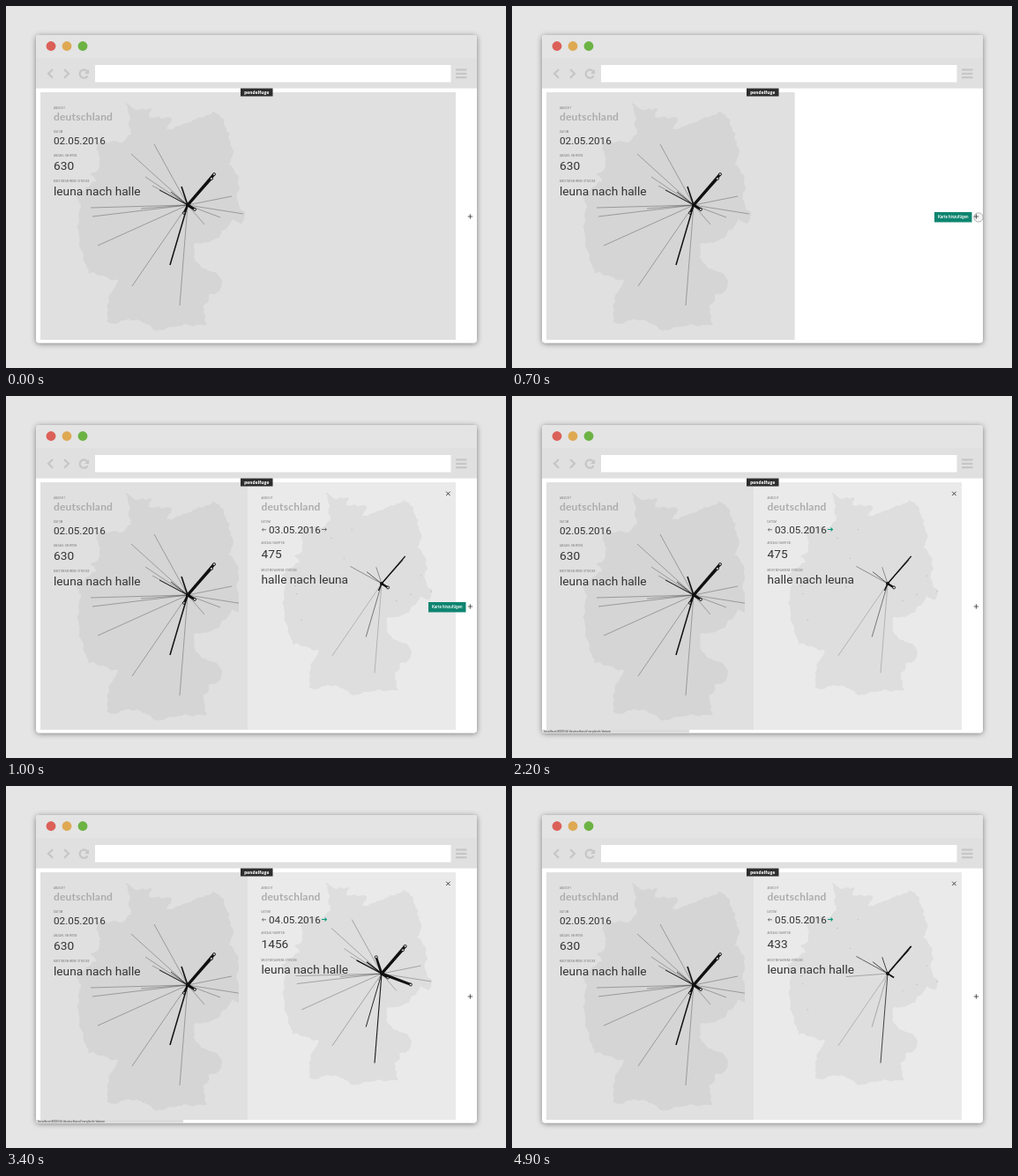
An HTML page that plays this animation: 567x411 px, repeating every 5100 ms.

```html
<!DOCTYPE html>
<html lang="de">
<head>
<meta charset="utf-8">
<title>Kartenvergleich</title>
<style>
html, body { margin: 0; width: 100%; height: 100%; overflow: hidden; background: #e5e5e5; }
svg { display: block; width: 567px; height: 411px; }
text { font-family: Roboto, Arial, sans-serif; fill: #333; }
.label { font-size: 2.9px; letter-spacing: .15px; fill: #777; }
.country { font: 700 12px Lato, sans-serif; letter-spacing: .2px; fill: #acacac; }
.date { font-size: 11.7px; }
.value { font-size: 13.7px; }
.icon { fill: none; stroke: #c6c6c6; stroke-width: 2.2; }
</style>
</head>
<body>
<svg viewBox="0 0 567 411">
  <defs>
    <filter id="shadow" x="-10%" y="-10%" width="120%" height="120%">
      <feDropShadow dx="0" dy="1" stdDeviation="3" flood-color="#000" flood-opacity=".45"/>
    </filter>
    <clipPath id="windowClip"><rect x="34" y="33" width="500" height="349.5"/></clipPath>
    <clipPath id="leftClip"><rect id="leftClipRect" x="39" y="98" height="281"/></clipPath>
    <clipPath id="rightClip"><rect x="284" y="98" width="216" height="281"/></clipPath>
  </defs>
  <rect x="34" y="33" width="500" height="349.5" rx="4" fill="#fff" filter="url(#shadow)"/>
  <path fill="#e4e4e4" d="M34 59V37q0-4 4-4H530q4 0 4 4V59Z"/>
  <rect x="34" y="59" width="500" height="34.5" fill="#e0e0e0"/>
  <circle cx="51" cy="45.5" r="5.4" fill="#db6058"/>
  <circle cx="69" cy="45.5" r="5.4" fill="#dfa953"/>
  <circle cx="87" cy="45.5" r="5.4" fill="#6cb344"/>
  <g class="icon">
    <path d="M53 72l-5 4.8l5 4.8M66 72l5 4.8l-5 4.8"/>
    <path d="M92.5 79.2a4.7 4.7 0 1 1-.4-5"/>
    <path d="M510 72.4h12.5M510 76.8h12.5M510 81.2h12.5"/>
  </g>
  <path fill="#c6c6c6" d="M94 72v5h-5Z"/>
  <rect x="101" y="67" width="403.5" height="19.5" fill="#fff"/>

  <rect id="leftBack" x="39" y="98" height="281" fill="#e0e0e0"/>
  <g id="leftMap" clip-path="url(#leftClip)"></g>
  <g id="leftText"></g>
  <g id="rightCard">
    <rect x="274" y="98" width="236" height="281" fill="#eaeaea"/>
    <g id="rightMaps" clip-path="url(#rightClip)"></g>
    <g id="rightText"></g>
    <path d="M499.2 108.6l4.4 4.4m0-4.4l-4.4 4.4" stroke="#333" stroke-width=".9"/>
    <path d="M295 151.8h-4.6m1.6-1.6l-1.6 1.6l1.6 1.6" fill="none" stroke="#444" stroke-width=".7"/>
    <circle id="nextRing" cx="362" cy="151.5" r="6.6" fill="#f3f3f3" stroke="#a9bcb6" stroke-width=".8"/>
    <path id="nextArrow" d="M358 151.5h5.4m-1.8-1.8l1.8 1.8l-1.8 1.8" fill="none"/>
  </g>

  <rect x="266" y="93.5" width="36.5" height="9" fill="#2d2d2d"/>
  <text x="284.3" y="99.7" text-anchor="middle" style="font:900 5.2px Lato,sans-serif;letter-spacing:.2px;fill:#fff">pendelfuge</text>

  <g id="addButton">
    <rect x="479" y="234" width="42.5" height="11.5" fill="#0e8570"/>
    <text x="500.2" y="241.4" text-anchor="middle" style="font-size:4.5px;font-weight:500;fill:#fff">Karte hinzufügen</text>
  </g>
  <circle id="addRing" cx="529" cy="240" r="5.2" fill="#f4f4f4" stroke="#999" stroke-width=".7"/>
  <path d="M523.7 239h5.4M526.4 236.3v5.4" stroke="#333" stroke-width=".8"/>
  <g id="status" clip-path="url(#windowClip)">
    <rect x="34" y="379" width="167" height="4" fill="#dcdcdc"/>
    <text x="36" y="382.3" style="font-size:3.6px;fill:#444">localhost:8000/#/deutschland/vergleich/datum</text>
  </g>
</svg>
<script>
const LOOP = 5100, STEP = 100;
const SLIDE_TIME = 400, SLIDE_WIDTH = 216, SMALL = .89;
const $ = id => document.getElementById(id);

// Border of the country as longitude, latitude pairs.
const border = [
  8.6,54.95, 10,54.75, 9.9,54.45, 11.1,54.4, 10.8,54.05, 12.5,54.47, 13.3,54.65, 14.2,53.92,
  14.4,53.25, 14.15,52.85, 14.65,52.5, 14.6,51.8, 15.04,51.27, 14.8,50.87, 14.35,51.03,
  12.3,50.2, 12.4,49.6, 13.8,48.77, 12.75,48.1, 13,47.5, 10.9,47.4, 10.2,47.3, 9.2,47.67,
  7.6,47.58, 7.7,48.4, 8.2,48.97, 6.6,49.2, 6.13,50.1, 6,50.8, 6.2,51.5, 5.95,51.83,
  7.05,52.3, 6.7,52.55, 7.05,52.65, 7.05,53.6, 8.3,53.6, 8.9,53.88, 8.75,54.2
];

// Destinations as dx, dy from the hub.
const places = [
  30,-35, 27,-30, 8,5, -4,9, -20,68, -7,-21, -9,114, -38,-69, -64,-58, -48,-32, -40,-22,
  -32,-17, -19,-15, -53,4, -110,3, -108,13, -102,46, -63,92, 63,10, 50,-10, 37,14, 19,22
];

// Line weights per day, by place; the rest get the base weight, and 0 is a single dot.
const days = [
  { base: .5, 0: 3.4, 1: 2.4, 2: 3, 3: 2.4, 4: 1.5, 5: 1.6, 11: 1, 12: .9 },
  { base: 0, 0: 1.4, 1: .9, 2: 2.2, 3: 1.4, 4: .7, 5: .6, 6: .2, 10: .6, 12: .8, 17: .2 },
  { base: .45, 0: 3.4, 1: 2, 2: 3, 4: 1, 5: 2.6, 6: 1.1, 11: 1.2, 12: 1.3, 20: 3 },
  { base: 0, 0: 1.7, 1: 1, 2: 1.8, 4: .4, 5: .9, 6: .9, 10: .8, 12: .9, 13: .4, 17: .2 }
];

const pairs = list => list.flatMap((v, i) => i % 2 ? [] : [[v, list[i + 1]]]);

function outline() {
  let seed = 7;
  const jitter = size => ((seed = seed * 16807 % 2147483647) / 2147483647 - .5) * size;
  let points = pairs(border).map(([lon, lat]) => [78 + (lon - 5.87) * 21.05, 106 + (55.06 - lat) * 33.76]);
  for (let pass = 0; pass < 4; pass++) {
    points = points.flatMap((p, i) => {
      const q = points[(i + 1) % points.length];
      const size = .33 * Math.hypot(q[0] - p[0], q[1] - p[1]);
      return [p, [(p[0] + q[0]) / 2 + jitter(size), (p[1] + q[1]) / 2 + jitter(size)]];
    });
  }
  return "M" + points.map(p => p.map(v => v.toFixed(1)).join(" ")).join("L") + "Z";
}
const country = outline();

function rays(x, y, day, scale) {
  return pairs(places).map(([dx, dy], i) => {
    const w = day[i] ?? day.base, ex = x + dx * scale, ey = y + dy * scale;
    if (!w) return `<circle cx="${ex}" cy="${ey}" r=".6" fill="#b5b5b5"/>`;
    const line = `<path d="M${x} ${y}L${ex} ${ey}" stroke="#111" stroke-width="${Math.max(w, .5)}" opacity="${Math.min(1, .3 + w * .6)}"/>`;
    return w < 2 ? line : line + `<circle cx="${ex}" cy="${ey}" r="1.5" fill="#ddd" stroke="#111" stroke-width=".9"/>`;
  }).join("") + `<circle cx="${x}" cy="${y}" r="2" fill="#111"/>`;
}

function cardText(x, dateX, rows, labels, values) {
  const names = ["ANSICHT", "DATUM", "ANZAHL FAHRTEN", "MEISTBEFAHRENE STRECKE"];
  const kinds = ["country", "date", "value", "value"];
  return names.map((name, i) =>
    `<text class="label" x="${x}" y="${labels[i]}">${name}</text>` +
    `<text class="${kinds[i]}" x="${i === 1 ? dateX : x}" y="${rows[i]}">${values[i]}</text>`).join("");
}

$("leftMap").innerHTML = `<path d="${country}" fill="#d5d5d5"/>` + rays(206, 226, days[0], 1);
$("leftText").innerHTML = cardText(54, 54, [130, 157, 186, 215.3], [117, 144, 171, 200],
  ["deutschland", "02.05.2016", "630", "leuna nach halle"]);

$("rightMaps").innerHTML = days.slice(1).map(day =>
  `<g><path transform="translate(241.8 11.7) scale(${SMALL})" d="${country}" fill="#dedede"/>${rays(426, 213, day, SMALL)}</g>`).join("");
const dayMaps = [...$("rightMaps").children];

$("rightText").innerHTML = [
  ["03.05.2016", "475", "halle nach leuna"],
  ["04.05.2016", "1456", "leuna nach halle"],
  ["05.05.2016", "433", "leuna nach halle"]
].map(values => `<g>${cardText(289.5, 298, [130, 155.8, 183.8, 213], [117, 144, 168, 199],
  ["deutschland", ...values])}</g>`).join("");
const dayTexts = [...$("rightText").children];

// CSS "ease" curve, solved by bisection.
function ease(t) {
  if (t <= 0) return 0;
  if (t >= 1) return 1;
  const bezier = (a, b, u) => 3 * a * u * (1 - u) ** 2 + 3 * b * u * u * (1 - u) + u ** 3;
  let low = 0, high = 1;
  for (let i = 0; i < 24; i++) {
    const mid = (low + high) / 2;
    if (bezier(.25, .25, mid) < t) low = mid; else high = mid;
  }
  return bezier(.1, 1, low);
}

const show = (node, on) => node.setAttribute("visibility", on ? "inherit" : "hidden");

function draw(now) {
  const t = Math.floor(now % LOOP / STEP) * STEP;
  const between = (from, to) => t >= from && t < to;

  const width = 471 - 236 * ease((t - 500) / 400);
  $("leftBack").setAttribute("width", width);
  $("leftClipRect").setAttribute("width", width - 10);
  show($("addButton"), between(400, 1100));
  show($("addRing"), between(600, 900));

  show($("rightCard"), t >= 900);
  const position = ease((t - 2650) / SLIDE_TIME) + ease((t - 3584) / SLIDE_TIME);
  dayMaps.forEach((map, i) => {
    const offset = i - position;
    show(map, Math.abs(offset) < 1);
    map.setAttribute("transform", `translate(${offset * SLIDE_WIDTH} 0)`);
    map.setAttribute("opacity", Math.max(0, 1 - Math.abs(offset)));
  });
  const day = t < 3100 ? 0 : t < 4000 ? 1 : 2;
  dayTexts.forEach((text, i) => show(text, t >= 900 && i === day));

  const hover = t >= 2200;
  $("nextArrow").setAttribute("stroke", hover ? "#0b9a80" : "#444");
  $("nextArrow").setAttribute("stroke-width", hover ? 1.1 : .7);
  show($("nextRing"), between(2600, 3100) || between(3500, 4000));
  show($("status"), between(2200, 4500));
}

const start = performance.now();
function tick() {
  draw(performance.now() - start);
  requestAnimationFrame(tick);
}
tick();
</script>
</body>
</html>
```
